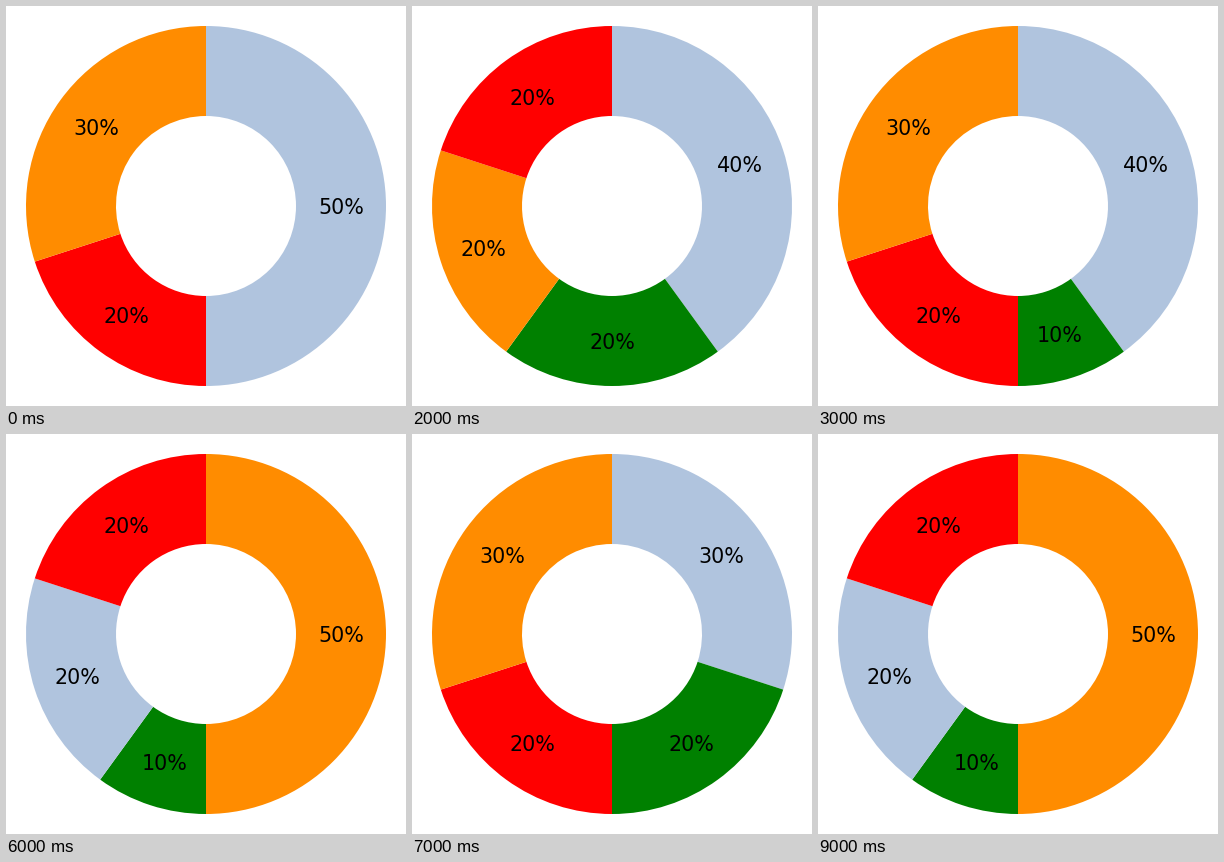
Recreate the animation shown at these times as a matplotlib script. Size 400x400 px, loop 10 s.

```python
import matplotlib.pyplot as plt
import numpy as np
from matplotlib.animation import FuncAnimation
from matplotlib.patches import Wedge

SIZE, DPI = 400, 100
CENTER = SIZE / 2
OUTER, INNER = 180, 90
LABEL_R = (OUTER + INNER) / 2
FONT_PX = 20.6
BASELINE = 8  # drop from the label centre to the baseline

COLORS = {"L": "lightsteelblue", "G": "green", "R": "red", "O": "darkorange"}

# One state per second; slices run clockwise from the top.
STATES = [
    "L50 R20 O30",
    "L40 G10 R20 O30",
    "L40 G20 O20 R20",
    "L40 G10 R20 O30",
    "L40 R20 O40",
    "L40 R20 O40",
    "O50 G10 L20 R20",
    "L30 G20 R20 O30",
    "O50 R20 L30",
    "O50 G10 L20 R20",
]

fig = plt.figure(figsize=(SIZE / DPI, SIZE / DPI), dpi=DPI, facecolor="white")
ax = fig.add_axes([0, 0, 1, 1])


def draw_slice(color, start, share):
    a0, a1 = start * 3.6 - 90, (start + share) * 3.6 - 90
    ax.add_patch(Wedge((CENTER, CENTER), OUTER, a0, a1, width=OUTER - INNER,
                       facecolor=color, linewidth=0))
    mid = np.radians((a0 + a1) / 2)
    ax.text(CENTER + LABEL_R * np.cos(mid),
            CENTER + LABEL_R * np.sin(mid) + BASELINE,
            f"{share}%", ha="center", va="baseline", color="black",
            family="DejaVu Sans", fontsize=FONT_PX * 72 / DPI)


def update(i):
    ax.clear()
    ax.set_xlim(0, SIZE)
    ax.set_ylim(SIZE, 0)
    ax.axis("off")
    start = 0
    for part in STATES[i].split():
        share = int(part[1:])
        draw_slice(COLORS[part[0]], start, share)
        start += share
    return []


anim = FuncAnimation(fig, update, frames=len(STATES), init_func=lambda: [],
                     interval=1000, repeat=True, repeat_delay=0)
plt.show()
```
